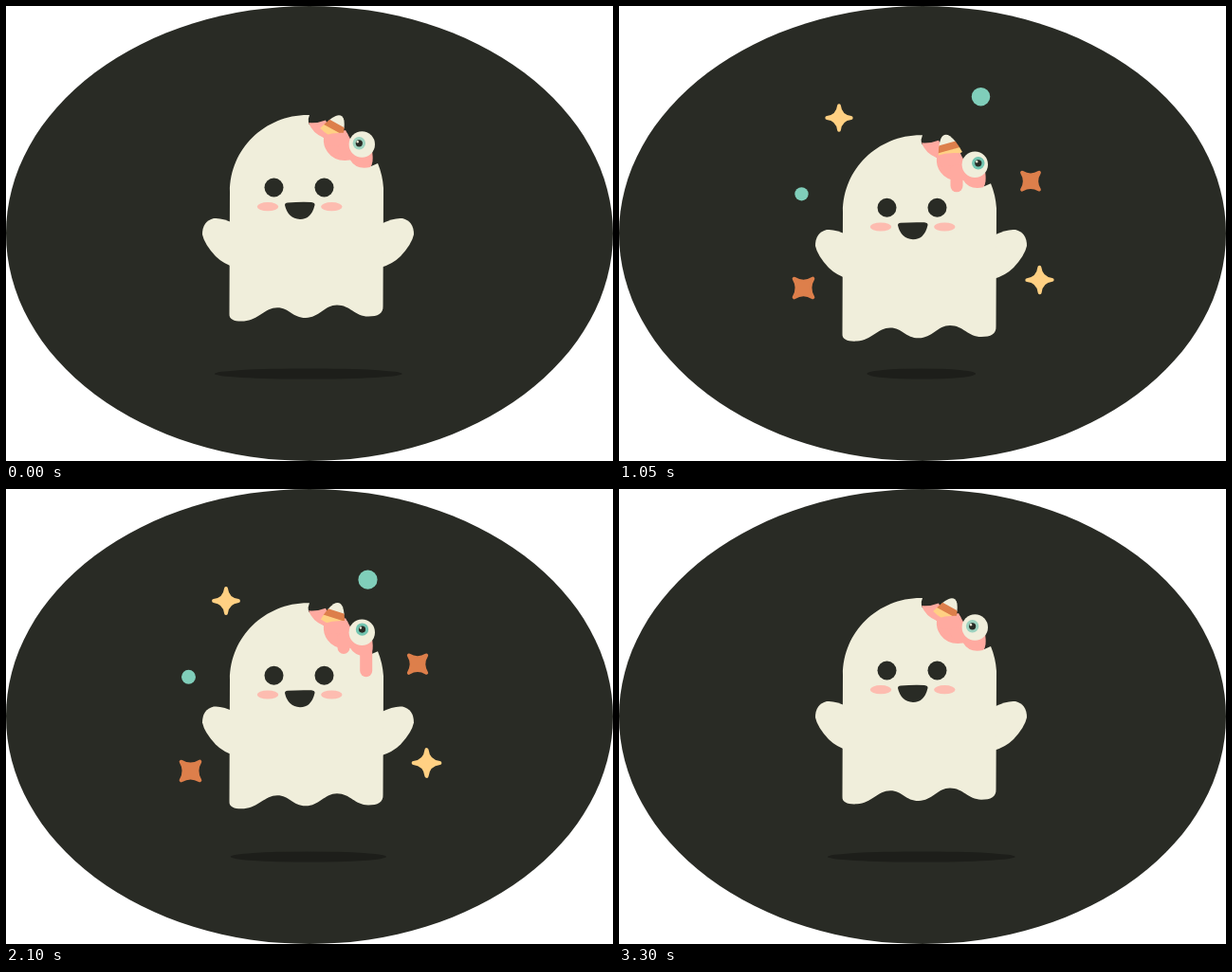
Write an HTML page with a canvas that moves like this. It is 640x480 px and loops after 3330 ms.

```html
<!DOCTYPE html>
<html lang="en">
<head>
<meta charset="utf-8">
<title>Floating ghost</title>
<style>
html, body { margin: 0; width: 100%; height: 100%; overflow: hidden; background: #fff; }
canvas { display: block; }
</style>
</head>
<body>
<canvas id="stage" width="640" height="480"></canvas>
<script>
const ctx = document.getElementById('stage').getContext('2d');
const LOOP = 3330, STEP = 30;
const CREAM = '#f0eedb', DARK = '#292b25', PINK = '#ffaaa0', ORANGE = '#dd7f4b',
      YELLOW = '#ffd083', TEAL = '#80ceba';

// Monotone cubic through [time, value] keys
function track(keys) {
  const slope = i => (keys[i + 1][1] - keys[i][1]) / (keys[i + 1][0] - keys[i][0]);
  const tangent = i => {
    if (i === 0 || i === keys.length - 1) return 0;
    const a = slope(i - 1), b = slope(i);
    return a * b > 0 ? 2 * a * b / (a + b) : 0;
  };
  return t => {
    if (t <= keys[0][0]) return keys[0][1];
    const i = keys.findIndex((k, n) => n < keys.length - 1 && t < keys[n + 1][0] && t >= k[0]);
    if (i < 0) return keys[keys.length - 1][1];
    const [t0, v0] = keys[i], [t1, v1] = keys[i + 1];
    const d = t1 - t0, u = (t - t0) / d, w = 1 - u;
    return v0 * w * w * (1 + 2 * u) + v1 * u * u * (3 - 2 * u)
      + d * u * w * (tangent(i) * w - tangent(i + 1) * u);
  };
}

const bob = track([[0, 0], [480, 6.5], [1050, 21.3], [1350, 23.7], [1500, 23.3], [1620, 21.5],
                   [1890, 11.5], [2160, 4], [2370, 1], [2600, 0], [LOOP, 0]]);
const armDrop = track([[0, 0], [480, 1], [1050, 12], [1500, 18], [1890, 11.5], [2370, 0]]);
const shadowWidth = track([[60, 99], [480, 87], [1050, 57.3], [1340, 53], [1500, 54],
                           [1890, 69.5], [2370, 96], [2560, 99]]);
const leftDrip = track([[650, 157], [1050, 175], [1500, 179], [1890, 178.5], [2340, 157]]);
const rightDrip = track([[1050, 165], [1500, 189], [1890, 193.5], [2370, 191], [2900, 165]]);
const gazeX = track([[0, -3], [200, -2.5], [480, 3], [1050, 3.5], [1500, 2], [1890, 2], [2370, -2.5], [LOOP, -2.7]]);
const gazeY = track([[0, -1.2], [1050, -1.5], [1500, -4], [1890, -4.3], [2370, -1.5], [LOOP, -1.2]]);
const irisAlpha = track([[0, .65], [300, 1], [2800, 1], [LOOP, .65]]);

const arm = new Path2D('M242 230Q228 223 219 224Q207 227 207 241Q209 251 221 264Q229 272 242 276Z');
const mouth = new Path2D('M297 207.5Q310 206.5 322 207Q326 207.5 325.5 210Q322 225 310 225Q297 224 294 210Q294 207.5 297 207.5Z');
const brain = new Path2D('M319 123Q328 124 337 120.5L340 127Q348 134 358 131L364 142L386 154Q388 166 384 170Q369 173 363 162.5Q347 165 339 154Q334 147 335 139Q323 134 319 123Z');
const candy = new Path2D('M-5 -10.5Q0 -16 5 -10.5Q10 -4 13 9Q0 13 -13 9Q-10 -4 -5 -10.5Z');

const dot = (x, y, size, from, to) => ({ x, y, size, color: TEAL, ...popTracks(from, to) });
const star = (x, y, size, color, angle, from, to) =>
  ({ x, y, size, color, angle, isStar: true, ...popTracks(from, to) });
function popTracks(from, to) {
  return {
    scale: track([[from, 0], [from + 270, 1.15], [from + 500, .88], [1500, 1.03],
                  [1890, .98], [2370, .89], [to - 160, 1.02], [to, 0]]),
    turn: track([[from, -60], [from + 500, 0], [to - 160, 0], [to, 60]])
  };
}
const sparkles = [
  star(232, 118, 16, YELLOW, 0, 340, 2920),
  star(194.5, 297.5, 17, ORANGE, 45, 250, 3000),
  star(434, 184.7, 16, ORANGE, 45, 350, 2900),
  star(443.5, 289, 17, YELLOW, 0, 580, 2690),
  dot(381.5, 95.7, 10.8, 400, 2900),
  dot(192.5, 198.3, 8, 450, 2820)
];

function fill(color, path) {
  ctx.fillStyle = color;
  ctx.fill(path);
}
function oval(x, y, rx, ry, color) {
  const p = new Path2D();
  p.ellipse(x, y, rx, ry, 0, 0, 7);
  fill(color, p);
}
function placed(x, y, degrees, draw) {
  ctx.save();
  ctx.translate(x, y);
  ctx.rotate(degrees * Math.PI / 180);
  draw();
  ctx.restore();
}

function drawSparkle(s, t) {
  const r = s.size * s.scale(t);
  if (r < .3) return;
  if (!s.isStar) return oval(s.x, s.y, r, r, s.color);
  placed(s.x, s.y, s.angle + s.turn(t), () => {
    const tip = r * .87, c = r * (s.angle ? .17 : .09);
    const p = new Path2D(`M0 ${-tip}Q${c} ${-c} ${tip} 0Q${c} ${c} 0 ${tip}Q${-c} ${c} ${-tip} 0Q${-c} ${-c} 0 ${-tip}Z`);
    ctx.strokeStyle = s.color;
    ctx.lineWidth = r * .26;
    ctx.lineJoin = 'round';
    ctx.stroke(p);
    fill(s.color, p);
  });
}

function bodyPath(t) {
  const tilt = -2.4 * Math.cos(2 * Math.PI * t / 1110);
  const l = -tilt, r = tilt;
  return new Path2D(`M320 115C274 114 236 150 236 196L235.5 ${322 + l}
    C235 ${329 + l} 242 ${330.5 + l} 251 ${330 + l}
    C266 ${329 + l} 273 ${317 + l * .5} 286 ${317 + l * .5}
    C299 ${317 + l * .5} 302 329 316 329
    C330 329 336 ${317 + r * .6} 349 ${317 + r * .6}
    C363 ${317 + r * .6} 368 ${330 + r} 382 ${330 + r}
    C392 ${330 + r} 398 ${327 + r} 397.5 ${319 + r}
    L398 192Q397 178 392 166L385 169L350 152L319 124Q318 119 320 115Z`);
}

function drip(x, bottom) {
  ctx.strokeStyle = PINK;
  ctx.lineWidth = 13;
  ctx.lineCap = 'round';
  ctx.beginPath();
  ctx.moveTo(x, 152);
  ctx.lineTo(x, bottom - 6.5);
  ctx.stroke();
}

function drawCandy(dy) {
  placed(347, 127.5, 29 - 2.1 * dy, () => {
    ctx.clip(candy);
    ctx.fillStyle = CREAM;
    ctx.fillRect(-20, -20, 40, 17);
    ctx.fillStyle = ORANGE;
    ctx.fillRect(-20, -4, 40, 8);
    ctx.fillStyle = YELLOW;
    ctx.fillRect(-20, 3.5, 40, 12);
  });
}

function drawEyeball(t) {
  const x = 375.3 + gazeX(t), y = 146 + gazeY(t);
  oval(375.3, 146, 13.7, 13.7, CREAM);
  ctx.globalAlpha = irisAlpha(t);
  oval(x, y, 6.7, 6.7, '#72c4b0');
  ctx.globalAlpha = 1;
  oval(x, y, 3.6, 3.6, DARK);
  oval(x - 1.6, y - 1.6, 1.2, 1.2, CREAM);
}

function drawGhost(t) {
  const dy = bob(t), drop = armDrop(t);
  ctx.save();
  ctx.translate(0, drop);
  fill(CREAM, arm);
  ctx.translate(637, 0);
  ctx.scale(-1, 1);
  fill(CREAM, arm);
  ctx.restore();

  ctx.save();
  ctx.translate(0, dy);
  fill(CREAM, bodyPath(t));
  fill(PINK, brain);
  drip(356, leftDrip(t));
  drip(379.7, rightDrip(t));
  drawCandy(dy);
  // Brain fold covering the foot of the candy
  fill(PINK, new Path2D('M334 137Q347 132.5 360 134L362 146L340 148Z'));
  drawEyeball(t);
  for (const x of [282.5, 335.5]) oval(x, 191.5, 10, 10, DARK);
  for (const x of [276, 343.3]) oval(x, 211.7, 11.2, 4.6, '#fdbcb0');
  fill(DARK, mouth);
  ctx.restore();
}

function render(now) {
  const t = Math.floor(now % LOOP / STEP) * STEP;
  ctx.clearRect(0, 0, 640, 480);
  oval(320, 240, 320, 240, DARK);
  oval(318.8, 388, shadowWidth(t), 5.6, '#1d1e1a');
  sparkles.forEach(s => drawSparkle(s, t));
  drawGhost(t);
  requestAnimationFrame(() => render(performance.now()));
}
render(0);
</script>
</body>
</html>
```
